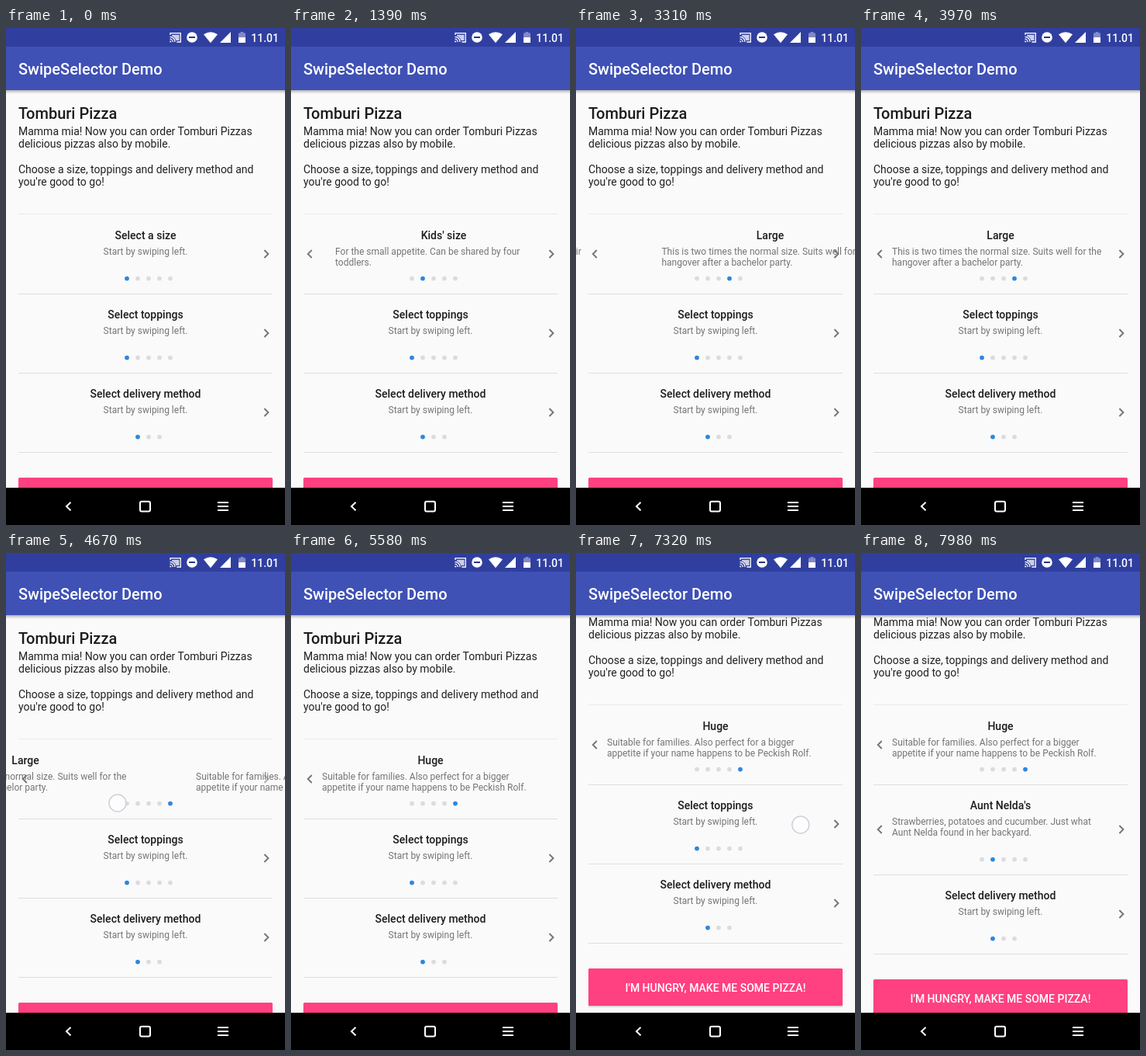
Animation, 360 px wide and 640 px high, one loop 8000 ms. Source, as an HTML page:

```html
<!DOCTYPE html>
<html lang="en">
<head>
<meta charset="utf-8">
<title>SwipeSelector Demo</title>
<style>
html, body { margin: 0; width: 100%; height: 100%; overflow: hidden; background: #fafafb; }
svg { display: block; width: 360px; height: 640px; font-family: Roboto, sans-serif; }
.head { font-size: 20px; font-weight: 500; }
.body { font-size: 14px; fill: #212121; }
.title { font-size: 14px; font-weight: 500; fill: #1c1c1c; text-anchor: middle; }
.desc { font-size: 12px; fill: #757575; }
.mid { text-anchor: middle; }
.arrow { fill: none; stroke: #757575; stroke-width: 1.9; }
.rule { fill: #dfdfe1; }
.line { fill: none; stroke: #fff; stroke-width: 2; }
</style>
</head>
<body>
<svg id="stage" viewBox="0 0 360 640">
  <defs>
    <linearGradient id="fall" x2="0" y2="1">
      <stop offset="0" stop-color="#555" stop-opacity=".45"/>
      <stop offset="1" stop-color="#888" stop-opacity="0"/>
    </linearGradient>
    <clipPath id="view"><rect y="80" width="360" height="512"/></clipPath>
  </defs>
  <rect width="360" height="640" fill="#fafafb"/>
  <g clip-path="url(#view)">
    <g id="content">
      <text class="head" x="16" y="117" fill="#1c1c1c">Tomburi Pizza</text>
      <text class="body" x="16" y="138">Mamma mia! Now you can order Tomburi Pizzas</text>
      <text class="body" x="16" y="154.4">delicious pizzas also by mobile.</text>
      <text class="body" x="16" y="187">Choose a size, toppings and delivery method and</text>
      <text class="body" x="16" y="203.4">you're good to go!</text>
      <rect class="rule" x="16" y="239" width="328" height="1" opacity=".6"/>
      <g id="list"></g>
      <g id="order">
        <rect x="16" y="626" width="328" height="4" fill="url(#fall)"/>
        <rect x="16" y="579" width="328" height="48" rx="1.5" fill="#ff4081"/>
        <text x="180" y="608.5" class="mid" font-size="14" font-weight="500" fill="#fff">I'M HUNGRY, MAKE ME SOME PIZZA!</text>
      </g>
    </g>
    <rect id="bar" x="356" width="4" fill="#b4b4b6"/>
  </g>
  <rect y="80" width="360" height="5" fill="url(#fall)"/>
  <rect y="24" width="360" height="56" fill="#3f51b5"/>
  <rect width="360" height="24" fill="#303f9f"/>
  <text class="head" x="16" y="60" fill="#fff">SwipeSelector Demo</text>
  <g fill="#fff">
    <path d="M212 9V6.7h13.3V18h-5M211.5 11.3a6.5 6.5 0 0 1 6.5 6.7M211.5 14.2a3.8 3.8 0 0 1 3.7 3.8" class="line" style="stroke-width:1.3"/>
    <path d="M214 8.7h9.5v7.3h-4.3q-1-4.5-5.2-5.6z" opacity=".75"/>
    <path d="M211.4 16.3a2 2 0 0 1 2 2h-2z"/>
    <circle cx="240" cy="12" r="6.8"/>
    <rect x="236" y="11" width="8" height="2" fill="#283588"/>
    <path d="M255 8.2q9-6 18 0L264 19.3z"/>
    <path d="M290 5v14h-14z"/>
    <path d="M300 6.5h2.6V5h3.8v1.5h2.6V12h-9z" opacity=".4"/>
    <path d="M300 12h9v7h-9z"/>
    <text x="352" y="17.5" text-anchor="end" font-size="14" font-weight="500">11.01</text>
  </g>
  <rect y="592" width="360" height="48"/>
  <path class="line" d="M83.5 610.8l-5.5 5.2 5.5 5.2M273 611h14M273 616h14M273 621h14"/>
  <rect class="line" x="173" y="609.8" width="13" height="12.6" rx="2"/>
  <circle id="touch" r="11" fill="#fff" fill-opacity=".6" stroke="#d2cfd8" stroke-width="1.5"/>
</svg>
<script>
const LOOP = 8000, GROWTH = 14, MAX_SCROLL = 44;
const START = 'Start by swiping left.';
const $ = id => document.getElementById(id);
const clamp = (v, lo = 0, hi = 1) => Math.min(hi, Math.max(lo, v));
const span = (t, a, b) => clamp((t - a) / (b - a));
const move = (node, x, y) => node.setAttribute('transform', `translate(${x} ${y})`);

function add(parent, tag, attrs, text = '') {
  const node = document.createElementNS('http://www.w3.org/2000/svg', tag);
  for (const key in attrs) node.setAttribute(key, attrs[key]);
  node.textContent = text;
  return parent.appendChild(node);
}

function makeSelector(count, pages) {
  const root = add($('list'), 'g', {});
  const strip = add(root, 'g', {});
  pages.forEach(([title, ...lines], i) => {
    const left = i * 360;
    add(strip, 'text', { class: 'title', x: left + 180, y: 271.5 }, title);
    lines.forEach((line, n) => add(strip, 'text', {
      class: i ? 'desc' : 'desc mid', x: left + (i ? 40 : 180), y: 292.3 + n * 14
    }, line));
  });
  const prev = add(root, 'path', { class: 'arrow', d: 'M26.8 286l-5 5 5 5' });
  const next = add(root, 'path', { class: 'arrow', d: 'M333.4 286l5 5-5 5' });
  const foot = add(root, 'g', {});
  const dots = Array.from({ length: count }, (_, i) =>
    add(foot, 'circle', { cx: 184 + (i - (count - 1) / 2) * 14, cy: 322.6, r: 2.9 }));
  add(foot, 'rect', { class: 'rule', x: 16, y: 342, width: 328, height: 1 });

  return (pos, selected, y, extra = 0) => {
    move(root, 0, y);
    move(strip, -pos * 360, 0);
    move(prev, 0, extra / 2);
    move(next, 0, extra / 2);
    move(foot, 0, extra);
    prev.setAttribute('opacity', clamp(pos));
    next.setAttribute('opacity', clamp(count - 1 - pos));
    dots.forEach((dot, i) => dot.setAttribute('fill', i === selected ? '#3086dc' : '#dcdcdf'));
  };
}

const drawSize = makeSelector(5, [
  ['Select a size', START],
  ["Kids' size", 'For the small appetite. Can be shared by four', 'toddlers.'],
  ['Normal', 'Our most popular size. Ideal for kids before their', 'growth spurt.'],
  ['Large', 'This is two times the normal size. Suits well for the', 'hangover after a bachelor party.'],
  ['Huge', 'Suitable for families. Also perfect for a bigger', 'appetite if your name happens to be Peckish Rolf.']
]);
const drawToppings = makeSelector(5, [
  ['Select toppings', START],
  ["Aunt Nelda's", 'Strawberries, potatoes and cucumber. Just what', 'Aunt Nelda found in her backyard.']
]);
const drawDelivery = makeSelector(3, [['Select delivery method', START]]);

// Finger gestures: press, first movement, release, then the path of the finger.
const swipe = (down, go, up, x0, y0, x1, y1, settle = 450) =>
  ({ down, go, up, x0, y0, x1, y1, settle });
const sizeSwipes = [
  swipe(930, 1000, 1210, 285, 288, 140, 305),
  swipe(2030, 2080, 2230, 250, 280, 110, 300, 330),
  swipe(2800, 2870, 3220, 300, 290, 150, 316),
  swipe(4430, 4480, 4668, 300, 298, 144, 322)
];
const toppingSwipes = [swipe(7260, 7320, 7500, 290, 350, 140, 366)];
const drag = swipe(5590, 5680, 6390, 255, 520, 261, 446);
const gestures = [...sizeSwipes, drag, ...toppingSwipes];

const fingerAt = (g, t) => Math.pow(span(t, g.go, g.up), 1.3);

function paging(list, t) {
  let pos = 0, selected = 0;
  for (const g of list) {
    const far = Math.max(0, g.x0 - g.x1 - 8) / 360;
    const rest = Math.pow(1 - span(t, g.up, g.up + g.settle), 5);
    pos += t < g.up ? far * fingerAt(g, t) : 1 - (1 - far) * rest;
    if (t >= g.up) selected++;
  }
  return [pos, selected];
}

function drawTouch(t) {
  const g = gestures.find(g => t >= g.down && t < g.up + 90);
  $('touch').setAttribute('opacity', g ? span(t, g.down, g.down + 60) * (1 - span(t, g.up + 5, g.up + 90)) : 0);
  if (!g) return;
  const u = fingerAt(g, t);
  move($('touch'), g.x0 + (g.x1 - g.x0) * u, g.y0 + (g.y1 - g.y0) * u);
}

function draw(t) {
  const scroll = clamp((drag.y0 - drag.y1) * fingerAt(drag, t) - 8, 0, MAX_SCROLL);
  const [topPos, topSel] = paging(toppingSwipes, t);
  const extra = topSel ? GROWTH : 0;
  drawSize(...paging(sizeSwipes, t), 0);
  drawToppings(topPos, topSel, 102, extra);
  drawDelivery(0, 0, 204 + extra);
  move($('order'), 0, extra);
  move($('content'), 0, -scroll);

  const ratio = 512 / (512 + MAX_SCROLL);
  $('bar').setAttribute('y', 80 + scroll * ratio);
  $('bar').setAttribute('height', 512 * ratio - 6);
  $('bar').setAttribute('opacity', scroll > 0 ? 1 - span(t, 6700, 6980) : 0);
  drawTouch(t);
}

function tick() {
  draw(performance.now() % LOOP);
  requestAnimationFrame(tick);
}
tick();
</script>
</body>
</html>
```
